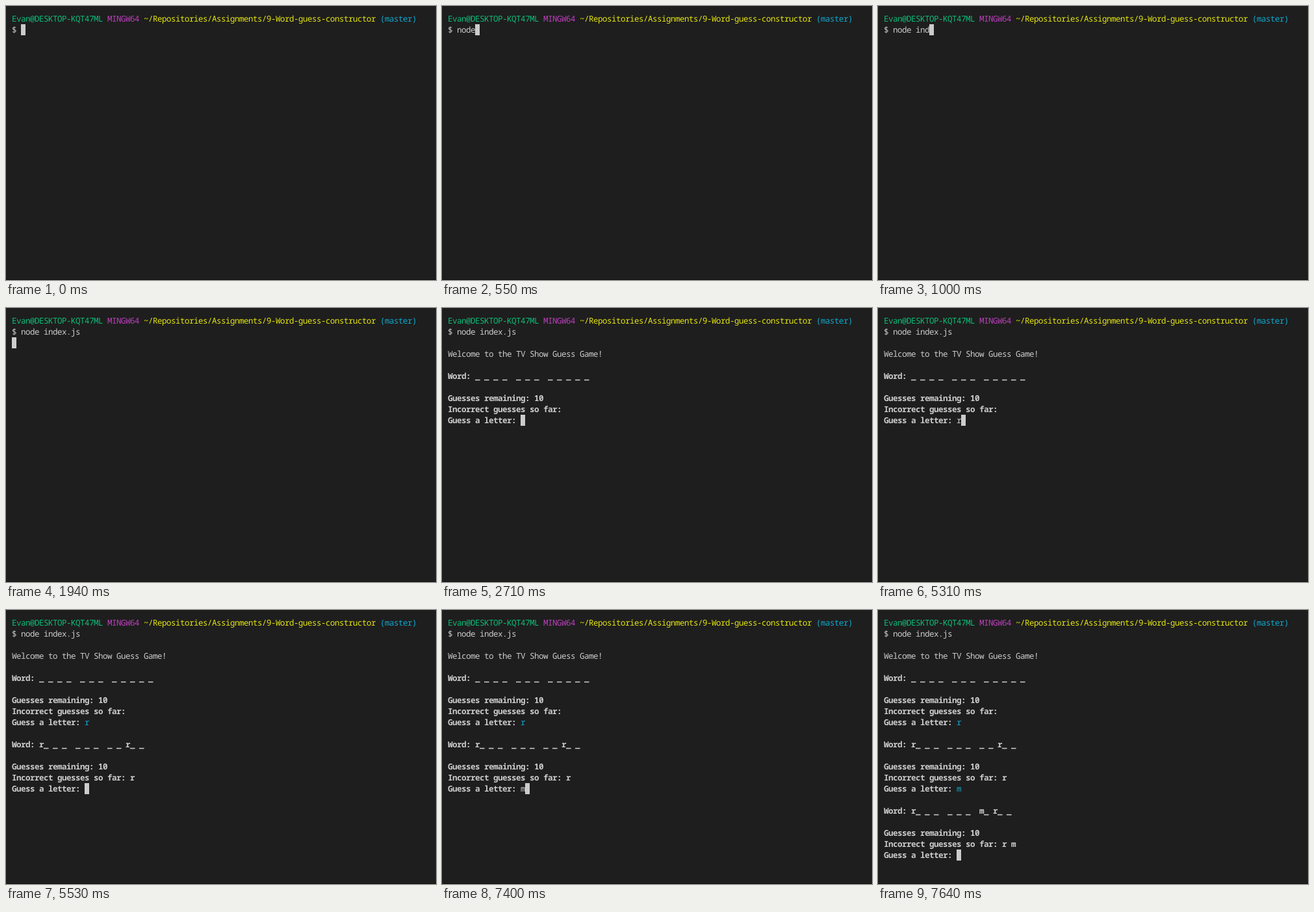
Write an HTML page that moves like this. It is 662 px wide and 421 px high and loops after 8 s.

```html
<!DOCTYPE html>
<html lang="en">
<head>
<meta charset="utf-8">
<title>Word guess terminal</title>
<style>
  html, body {
    margin: 0;
    width: 100%;
    height: 100%;
    overflow: hidden;
    background: #1e1e1e;
  }
  body::after {
    content: "";
    position: absolute;
    left: 0;
    right: 0;
    top: 420px;
    height: 1px;
    background: #121212;
  }
  #term {
    position: absolute;
    left: 9px;
    top: 11px;
    margin: 0;
    color: #ccc;
    font: 12.6px/17px "Noto Sans Mono", "DejaVu Sans Mono", monospace;
    letter-spacing: calc(7px - 1ch);
    font-variant-ligatures: none;
    text-rendering: geometricPrecision;
    white-space: pre;
  }
  b { font-weight: 600; }
  .green { color: #0dbc79; }
  .purple { color: #bc3fbc; }
  .yellow { color: #e5e510; }
  .cyan { color: #11a8cd; }
  .cursor {
    display: inline-block;
    width: 7px;
    height: 17px;
    vertical-align: top;
    background: #ccc;
  }
</style>
</head>
<body>
<pre id="term"></pre>
<script>
  const LOOP = 8000;
  const COMMAND = "node index.js";
  const KEY_TIMES = [230, 310, 400, 550, 690, 860, 930, 1000, 1100, 1330, 1480, 1720, 1870];
  const ENTER = 1940;

  const ROUNDS = [
    { at: 2710, word: "_ _ _ _  _ _ _  _ _ _ _ _", tried: "", key: "r", typed: [[4290, 4990], [5310, 5530]] },
    { at: 5530, word: "r_ _ _  _ _ _  _ _ r_ _", tried: "r", key: "m", typed: [[7400, 7640]] },
    { at: 7640, word: "r_ _ _  _ _ _  m_ r_ _", tried: "r m", key: "", typed: [] }
  ];

  const paint = (color, text) => `<span class="${color}">${text}</span>`;
  const cursor = paint("cursor", "");
  const prompt = [
    paint("green", "Evan@DESKTOP-KQT47ML"),
    paint("purple", "MINGW64"),
    paint("yellow", "~/Repositories/Assignments/9-Word-guess-constructor"),
    paint("cyan", "(master)")
  ].join(" ");

  function roundText(round, next, t) {
    const held = round.typed.some(([from, to]) => t >= from && t < to);
    const answer = next && t >= next.at
      ? paint("cyan", round.key)
      : (held ? round.key : "") + cursor;
    return `\n<b>Word: ${round.word}\n\nGuesses remaining: 10\n` +
      `Incorrect guesses so far: ${round.tried}\nGuess a letter: </b>${answer}\n`;
  }

  function screen(t) {
    const count = KEY_TIMES.filter(time => time <= t).length;
    let out = `${prompt}\n$ ${COMMAND.slice(0, count)}`;
    if (t < ENTER) return out + cursor;
    out += "\n";
    if (t < ROUNDS[0].at) return out + cursor;
    out += "\nWelcome to the TV Show Guess Game!\n";
    ROUNDS.forEach((round, i) => {
      if (t >= round.at) out += roundText(round, ROUNDS[i + 1], t);
    });
    return out;
  }

  const term = document.getElementById("term");
  let shown = "";

  function draw() {
    const html = screen(performance.now() % LOOP);
    if (html !== shown) term.innerHTML = shown = html;
    requestAnimationFrame(draw);
  }
  draw();
</script>
</body>
</html>
```
